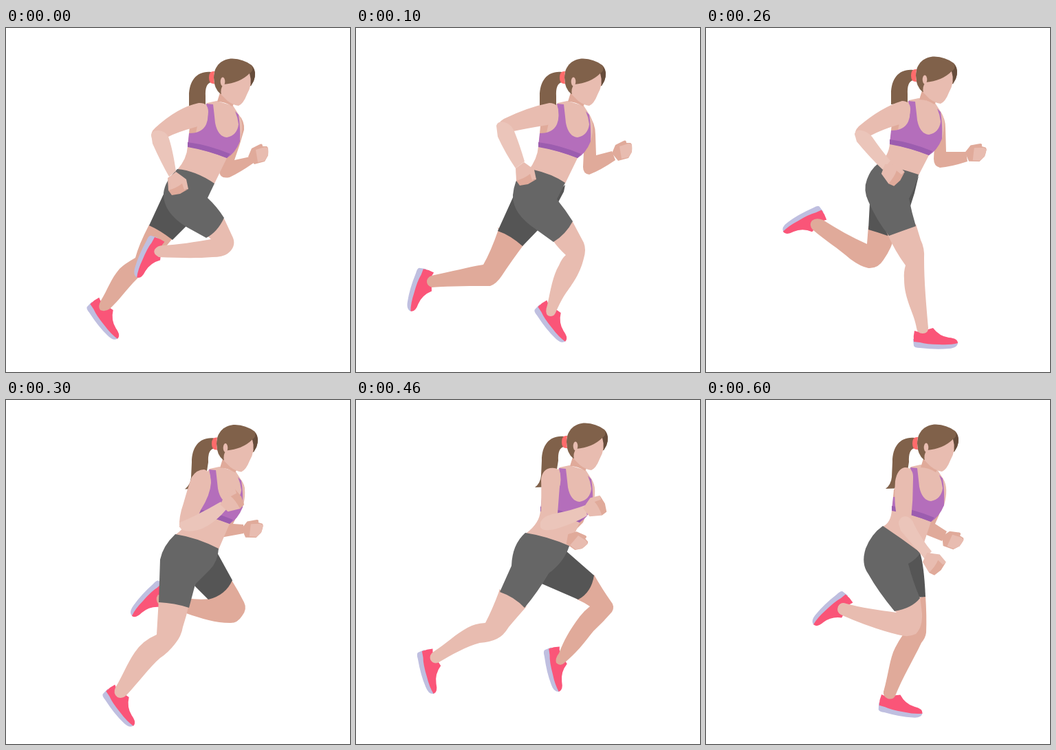
These frames come from a looping animation (500x500 px, 700 ms). An HTML page:

```html
<!DOCTYPE html>
<html lang="en">
<head>
<meta charset="utf-8">
<title>Runner</title>
<style>
html, body { margin: 0; width: 100%; height: 100%; overflow: hidden; background: #fff; }
svg { display: block; width: 100vw; height: 100vh; }
</style>
</head>
<body>
<svg id="stage" viewBox="0 0 500 500"></svg>
<script>
const STEP = 100;
const POSES = 7;
const color = {
  skin: '#e8bcb0', shade: '#e0aa9a', light: '#ebc5ba',
  hair: '#80614a', darkHair: '#664c3b', tie: '#ff6b6b',
  top: '#b46ebb', band: '#9c5daf',
  shorts: '#666', farShorts: '#555',
  shoe: '#fa5578', sole: '#bfbfe0'
};

// One outline per pose
const farArm = [
  'M338 126Q347 135 346 148Q340 170 332 192L355 187L360 196Q340 210 325 217Q310 220 310 207Q310 195 320 182Z',
  'M338 126Q348 138 348 155L349 185L372 179L377 192Q355 207 339 213Q330 212 330 202L331 180Z',
  'M341 122Q348 132 348 145L349 180L378 180L380 194Q355 202 340 203Q331 201 331 190L332 170Z',
  'M340 115Q348 122 347 135L345 150L330 180L345 181L345 194L312 200L318 180Z',
  'M340 115Q347 120 347 135L330 178L318 190L312 212L308 208Z',
  'M334 116Q341 123 341 135L335 150L315 190L326 196L321 210L308 203Z',
  'M342 113Q349 122 347 135Q345 155 333 180L350 191L343 205L318 195Z'
];
const farLeg = [
  'M208 286L243 305Q232 318 222 330Q205 350 190 365C175 380 165 395 151 408Q144 413 137 410Q133 405 138 396C148 380 152 365 165 350Q172 343 188 334Q193 315 208 286Z',
  'M206 290L246 312Q225 340 212 360Q204 372 195 375C170 375 140 375 110 377Q102 374 103 367Q105 360 114 359C140 354 160 348 185 344Q196 325 207 293Z',
  'M236 288L275 300Q270 320 258 337Q250 350 236 349Q225 347 210 336C192 320 172 308 155 293Q149 286 154 280Q160 275 170 279C190 292 212 304 234 314Z',
  'M290 285L328 262Q338 278 346 294Q351 304 343 314Q336 325 325 324C305 324 285 318 262 310L222 297Q216 290 221 283L262 288Q280 291 297 289Z',
  'M315 285L346 254Q358 275 370 292Q377 300 372 308Q360 322 345 336C330 355 320 368 303 382Q297 388 291 382Q289 376 295 368C302 350 310 335 325 315Q332 306 340 300Q331 294 322 290Z',
  'M298 297L337 277Q345 298 356 315Q361 322 360 335C356 365 357 395 357 428Q354 433 347 432Q339 432 339 425C337 405 328 385 328 360Q327 350 331 340Q315 320 301 300Z',
  'M285 300L319 284Q321 315 320 338Q319 346 313 353C301 378 286 403 275 430Q272 436 264 434Q257 431 258 424C265 400 267 375 275 360Q280 350 287 340Z'
];
const nearLeg = [
  'M285 295L317 277L330 305Q335 318 322 328Q315 333 300 333C275 335 250 334 222 333Q213 328 216 322Q220 316 228 316C250 315 275 311 298 307Z',
  'M287 305L314 280L331 312Q335 322 331 335C325 360 312 375 302 390Q296 400 290 414Q287 421 279 418Q274 414 278 403C283 380 286 360 295 345Q299 335 305 330Q294 320 287 310Z',
  'M262 296L305 285L312 308Q318 320 317 335C317 370 320 400 323 436Q323 444 315 444Q307 444 306 436C303 415 288 395 288 365Q287 355 290 345Q275 325 262 296Z',
  'M222 290L266 297Q262 315 257 330Q255 343 246 354Q236 367 224 375C209 388 191 412 176 428Q170 435 162 432Q155 427 159 418C170 400 175 385 187 367Q198 350 219 341Z',
  'M208 275L248 300Q232 318 222 330Q214 343 205 347Q195 352 180 353C160 358 140 370 119 382Q111 384 108 377Q106 370 114 365C130 355 145 340 162 331Q172 325 188 324Q198 305 208 278Z',
  'M210 292L250 306Q235 320 224 335Q217 346 208 348Q200 347 190 340C170 328 145 315 120 301Q114 296 117 288Q121 281 130 284C155 292 180 300 204 313Q210 304 211 294Z',
  'M270 302L311 286L314 310Q315 330 305 340Q295 345 283 342C260 337 225 325 196 312Q189 308 192 300Q196 293 204 296C225 302 250 305 277 309Z'
];
const farShorts = [
  'M232 235L208 287Q224 294 242 308L265 285Z',
  'M230 242L206 295Q224 301 242 317L268 290ZM304 228L302 238L294 253L285 245Z',
  'M238 255L236 293Q250 297 264 302L270 290ZM309 215L303 240L296 262L290 245Z',
  'M307 222L329 262Q319 284 294 290L274 270L290 230Z',
  'M306 220L346 255Q342 280 323 290L270 267L290 235Z',
  'M304 226L337 279Q318 287 301 301L273 270L290 235Z',
  'M311 222Q317 240 319 286L308 287L290 238Z'
];
const nearShorts = [
  'M249 205Q275 207 303 226L293 247Q307 260 317 276Q307 297 291 305L262 289Q228 268 229 240Q231 222 249 205Z',
  'M258 206Q285 212 304 225L292 249Q305 265 315 281Q305 300 287 311L262 293Q227 270 228 243Q230 222 240 210Z',
  'M249 198Q280 203 309 213Q304 232 295 248Q299 268 305 288Q285 295 266 302Q248 280 236 252Q228 235 234 220Q239 206 249 198Z',
  'M246 195Q278 200 309 216Q308 235 296 247L275 268L266 302Q245 295 222 294L224 232Q228 212 246 195Z',
  'M246 193Q278 198 310 212Q303 235 280 252Q265 278 245 302Q230 286 209 279L226 241Q227 210 246 193Z',
  'M247 192Q278 196 306 215Q303 235 283 250Q268 280 251 310Q231 309 211 296L219 238Q228 205 247 192Z',
  'M257 183Q284 201 312 222Q305 232 294 238Q300 262 311 288Q299 303 274 307Q250 278 236 253Q225 238 232 216Q240 195 257 183Z'
];
const upperArm = [
  'M280 109Q294 108 294 122Q293 140 272 145Q250 151 236 158L212 160Q209 152 217 145Q250 115 280 109Z',
  'M281 109Q295 109 294 124Q293 140 272 142Q248 146 229 150L205 150Q204 138 215 132Q250 115 281 109Z',
  'M285 106Q298 106 297 120Q295 138 278 141Q255 148 240 156L217 158Q215 150 222 143Q255 115 285 106Z',
  'M288 101Q297 103 298 120Q297 138 283 160L272 185L252 185Q251 170 258 150Q265 125 270 112Q277 101 288 101Z',
  'M282 99Q298 97 297 112L293 165L268 185Q270 140 269 115Q271 101 282 99Z',
  'M282 102Q296 100 295 118L293 165L275 180Q268 160 269 118Q272 104 282 102Z',
  'M289 98Q302 98 301 115Q301 145 298 175L282 185Q272 160 275 118Q278 100 289 98Z'
];
const forearm = [
  'M211 155Q213 148 222 149Q232 150 236 158Q242 175 247 208L237 216Q225 195 213 168Z',
  'M204 142Q206 135 216 137Q226 140 230 150Q238 170 245 194L232 204Q217 182 206 158Z',
  'M216 154Q218 147 227 149Q237 152 242 159Q255 178 268 193L257 206Q238 188 219 165Z',
  'M252 178Q258 176 275 168Q295 158 312 148L321 158Q305 178 285 187Q265 194 255 188Q251 184 252 178Z',
  'M268 178Q272 168 290 165Q315 160 333 153L336 168Q320 178 295 186Q272 193 268 185Z',
  'M273 178Q274 169 290 167Q315 166 340 162L341 180Q310 187 288 188Q274 188 273 178Z',
  'M280 180Q280 170 290 169Q299 170 303 182Q315 205 328 220L318 231Q300 210 283 190Z'
];

// Placements: x, y, angle
const farShoe = [[143, 401, 50], [110, 367, 105], [165, 285, 149], [230, 287, 131], [299, 370, 75], [347, 427, 8], [267, 430, 9]];
const nearShoe = [[226, 322, 112], [285, 405, 50], [315, 440, 0], [166, 423, 50], [115, 373, 73], [129, 290, 127], [205, 303, 135]];
const farFist = [[367, 183, 0], [387, 178, 0], [392, 181, 16], [358, 187, 16], [321, 204, 50], [334, 210, 48], [358, 203, 34]];
const nearFist = [[249, 226, 0], [246, 212, 0], [271, 211, -32], [328, 147, -100], [347, 155, -92], [353, 171, -85], [331, 236, -28]];
const headAt = [[0, 0], [1, 0], [3, -3], [4, -8.5], [4, -11], [-4, -6], [5, -9]];
const chestAt = [[0, 0], [1, 0], [3, -4], [4, -9], [4, -11], [-1, -8], [6, -12]];
const waist = [
  [249, 206, 303, 226], [250, 208, 304, 226], [250, 199, 309, 214], [246, 196, 309, 217],
  [247, 194, 310, 213], [247, 193, 306, 216], [257, 184, 312, 222]
];

const path = (d, fill) => `<path d="${d}" fill="${fill}"/>`;
const place = ([x, y, angle = 0], art) => `<g transform="translate(${x} ${y}) rotate(${angle})">${art}</g>`;

const shoeArt =
  path('M-14 12L-13 22Q-12 25 -4 25Q20 28 38 26Q51 25 51 17Z', color.sole) +
  path('M-12 0Q-3 4 8 -2L15 -4Q24 8 38 10Q51 11 51 18Q40 21 24 20Q6 20 -4 17L-13 16Q-14 8 -12 0Z', color.shoe);

const farFistArt =
  path('M-15 4L-10 -8L0 -13Q6 -17 6 -11L12 -11Q15 -10 14 2L9 11L-6 15Z', color.shade) +
  path('M-4 -6L9 -10L14 -9L14 2L9 10L-1 12Z', color.skin);

const nearFistArt =
  path('M-14 -8L-2 -17Q8 -10 13 -6L16 8L-4 12L-13 10Z', color.skin) +
  path('M-13 10Q0 6 7 0L10 9L16 8L4 15L-8 17Z', color.shade);

const headArt =
  path('M311 94L307 107Q318 107 329 114L332 109L320 100Z', color.shade) +
  path('M302 72C302 54 315 44.5 329 44.5Q345 45 357 54Q365 62 360 77L356 84L330 92L312 96Q302 88 302 72Z', color.hair) +
  path('M354 66Q360 62 358 56Q365 64 360 77L356 84Z', color.darkHair) +
  path('M316 82Q340 80 354 66Q359 82 350 97Q345 110 338 113Q330 112 322 106L313 97Q311 88 316 82Z', color.skin) +
  `<ellipse cx="315" cy="78" rx="3.3" ry="6.5" fill="${color.skin}"/>` +
  path('M303 63Q295 62 295 72Q295 82 303 81Q301 72 303 63Z', color.tie);

const topArt =
  path('M267 142L279 138L276 152L266 154Z', color.shade) +
  path('M291 110L301 111Q303 128 304 138Q308 158 321 159Q336 156 338 140Q337 130 333 121L338 126Q341 145 340 165Q333 182 321 189Q293 178 264 172L266 153Q285 153 291 140Q296 128 291 110Z', color.top) +
  path('M264 166Q295 170 326 183L321 189Q293 178 264 173Z', color.band);

function ponytail(pose) {
  const end = pose < 3 ? 'L266 114L290 112' : 'L265 121Q264 132 256 138L284 137';
  return path(`M298 64C278 62 266 76 266 99${end}L290 99Q289 81 298 79Z`, color.hair);
}

function torso(pose) {
  const [x, y] = chestAt[pose];
  const [left, leftY, right, rightY] = waist[pose];
  const at = (px, py) => `${px + x} ${py + y}`;
  return path(`M${at(268, 140)}L${at(292, 109)}L${at(306, 106)}L${at(330, 113)}L${at(339, 127)}` +
    `Q${at(347, 140)} ${at(340, 165)}L${at(321, 189)}L${right} ${rightY}L${right - 15} ${rightY + 8}` +
    `L${left} ${leftY + 4}L${left} ${leftY}Q${at(263, 190)} ${at(264, 172)}Z`, color.skin);
}

const drawPose = pose => [
  place(headAt[pose], ponytail(pose)),
  path(farArm[pose], color.shade),
  place(farShoe[pose], shoeArt),
  path(farLeg[pose], color.shade),
  path(farShorts[pose], color.farShorts),
  place(nearShoe[pose], shoeArt),
  path(nearLeg[pose], color.skin),
  torso(pose),
  place(farFist[pose], farFistArt),
  path(nearShorts[pose], color.shorts),
  place(chestAt[pose], topArt),
  place(headAt[pose], headArt),
  path(upperArm[pose], color.skin),
  path(forearm[pose], color.light),
  place(nearFist[pose], nearFistArt)
].join('');

const stage = document.getElementById('stage');
const start = performance.now();
let shown = -1;

function update(now) {
  const pose = Math.floor(Math.max(0, now - start) / STEP) % POSES;
  if (pose !== shown) {
    stage.innerHTML = drawPose(pose);
    shown = pose;
  }
  requestAnimationFrame(update);
}
update(start);
</script>
</body>
</html>
```
